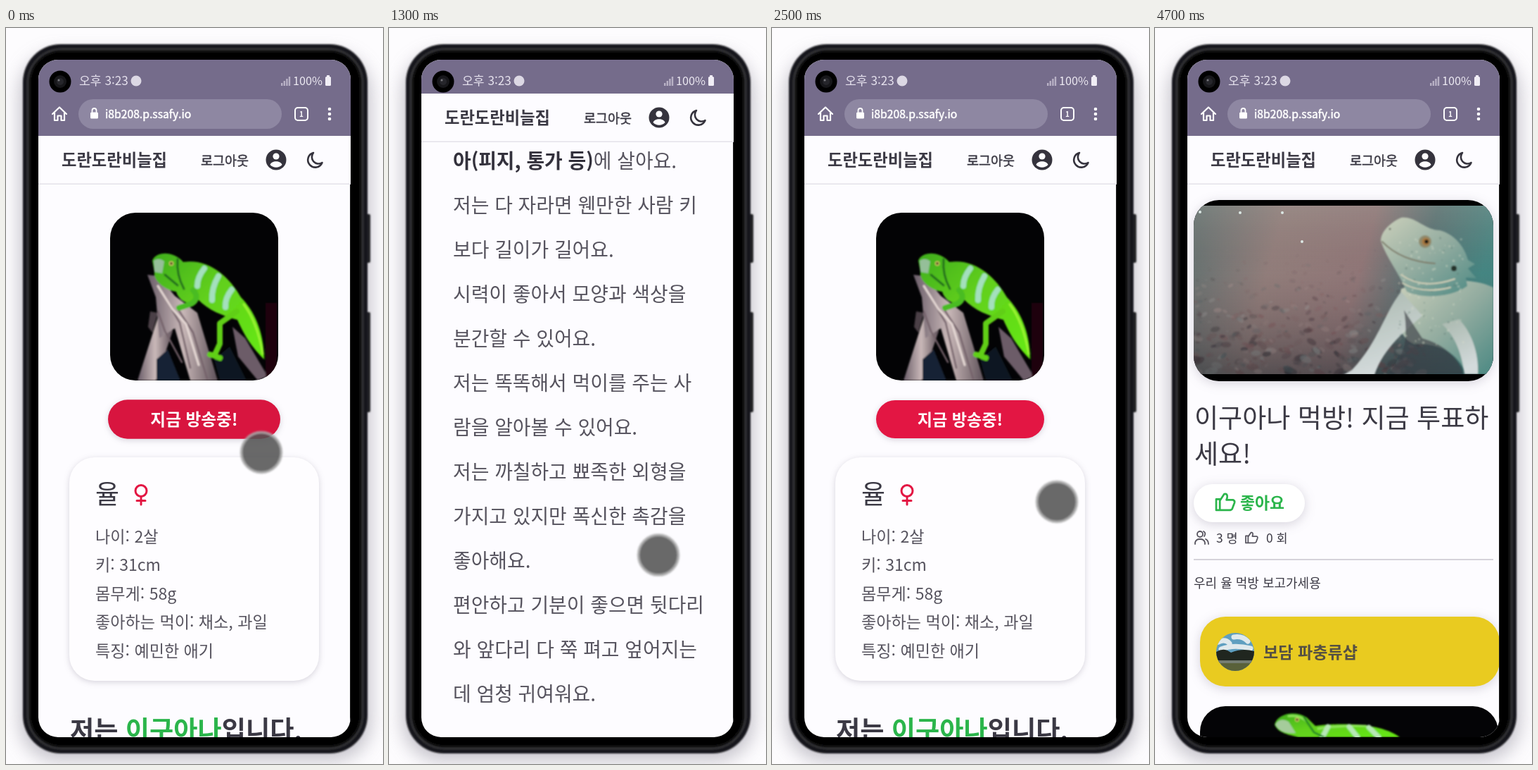
An HTML page for the animation above (4.8 s loop, 536 by 1044 pixels).

```html
<!DOCTYPE html>
<html lang="ko">
<head>
<meta charset="utf-8">
<style>
  html, body { margin: 0; width: 100%; height: 100%; overflow: hidden; background: #fdfcfe; }
  svg { display: block; width: 100vw; height: 100vh; }
  text { font-family: 'Noto Sans CJK KR', 'Noto Sans CJK JP', 'Noto Sans CJK', sans-serif; white-space: pre; }
  .line { fill: none; stroke-linecap: round; stroke-linejoin: round; }
  .soft { filter: drop-shadow(0 2px 4px rgba(60, 50, 80, .2)); }
  .glow { filter: drop-shadow(0 3px 8px rgba(60, 50, 80, .2)); }
</style>
</head>
<body>
<svg id="stage" viewBox="0 0 536 1044"></svg>
<script>
const LOOP = 4800;
const INK = '#3b3944', BODY = '#56535e', GREEN = '#2bb54b', RED = '#e31643', PAPER = '#fdfcff', PURPLE = '#756c8b';

// y is the optical centre of the Hangul glyphs
const text = (x, y, size, fill, weight, str, extra = '') =>
  `<text x="${x}" y="${y + size * .37}" font-size="${size}" fill="${fill}" font-weight="${weight}" ${extra}>${str}</text>`;
const medium = (x, y, size, fill, str) => text(x, y, size, fill, 400, str, `stroke="${fill}" stroke-width=".5"`);
const box = (x, y, w, h, r, fill, extra = '') =>
  `<rect x="${x}" y="${y}" width="${w}" height="${h}" rx="${r}" fill="${fill}" ${extra}/>`;
const dot = (x, y, r, fill, extra = '') => `<circle cx="${x}" cy="${y}" r="${r}" fill="${fill}" ${extra}/>`;
const shape = (d, fill, extra = '') => `<path d="${d}" fill="${fill}" ${extra}/>`;
const line = (d, color, width, extra = '') =>
  `<path class="line" d="${d}" stroke="${color}" stroke-width="${width}" ${extra}/>`;
const bold = (str, fill = '#33313c') => `<tspan font-weight="600" fill="${fill}">${str}</tspan>`;

function seeded(seed) {
  return () => (seed = (seed * 16807) % 2147483647) / 2147483647;
}

const defs = `<defs>
  <clipPath id="screen">${box(46, 45, 444, 961, 28, '#000')}</clipPath>
  <clipPath id="below">${box(46, 93, 444, 913, 0, '#000')}</clipPath>
  <clipPath id="photo">${box(148, 262, 239, 238, 36, '#000')}</clipPath>
  <clipPath id="video">${box(55, 244, 426, 257, 36, '#000')}</clipPath>
  <clipPath id="frame">${box(55, 252, 426, 239, 0, '#000')}</clipPath>
  <clipPath id="avatar">${dot(114, 885, 27, '#000')}</clipPath>
  <linearGradient id="skin" x2="1" y2="1">
    <stop stop-color="#3fae1c"/><stop offset=".45" stop-color="#62d01e"/><stop offset="1" stop-color="#66ea10"/>
  </linearGradient>
  <linearGradient id="bark" x2="1"><stop stop-color="#695c68"/><stop offset=".5" stop-color="#c9b8b8"/><stop offset="1" stop-color="#5f525a"/></linearGradient>
  <linearGradient id="scene" x2="1" y2=".15">
    <stop stop-color="#5d7271"/><stop offset=".3" stop-color="#94817e"/><stop offset=".6" stop-color="#92797a"/><stop offset=".8" stop-color="#4e7273"/><stop offset="1" stop-color="#3f8a86"/>
  </linearGradient>
  <linearGradient id="shade" x2="0" y2="1"><stop stop-color="#a39a94" stop-opacity=".35"/><stop offset=".4" stop-color="#7a5d5e" stop-opacity=".1"/><stop offset="1" stop-color="#23282e" stop-opacity=".55"/></linearGradient>
  <linearGradient id="dragon" x2="1" y2="1"><stop stop-color="#cbd0bb"/><stop offset=".5" stop-color="#93aca0"/><stop offset="1" stop-color="#4c8983"/></linearGradient>
  <linearGradient id="limb" x2=".3" y2="1"><stop stop-color="#a9b8ae"/><stop offset="1" stop-color="#d3dadb"/></linearGradient>
  <filter id="blur"><feGaussianBlur stdDeviation="1.3"/></filter>
  <filter id="soften"><feGaussianBlur stdDeviation=".8"/></filter>
  <filter id="halo" x="-20%" y="-20%" width="140%" height="140%"><feGaussianBlur stdDeviation="13"/></filter>
</defs>`;

function phone() {
  return box(19, 36, 500, 1004, 56, '#aeabb6', 'filter="url(#halo)" opacity=".7"') +
    `<g filter="url(#soften)">` +
    box(511, 264, 7, 69, 2, '#242428') + box(511, 403, 7, 142, 2, '#242428') +
    box(24, 23, 490, 1006, 54, '#19191c') +
    box(31, 30, 476, 992, 48, '#0a0a0b', 'stroke="#343437" stroke-width="2.5"') +
    box(36, 35, 466, 982, 42, '#000') + `</g>`;
}

function statusBar() {
  const bars = [0, 1, 2, 3].map(i => box(391 + i * 3.6, 78 - i * 3, 2.4, 4 + i * 3, 0, '#b8b1c5')).join('');
  return box(46, 45, 444, 48, 0, PURPLE) +
    dot(77, 76, 15.5, '#000') + dot(77, 76, 9, '#17171a') + dot(77, 76, 5, '#26262b') + dot(75, 74, 1.5, '#77777c') +
    text(104, 75, 17.2, '#e6e2ee', 400, '오후 3:23') + dot(185, 75, 7.5, '#dcd8e4') +
    bars + text(408, 75, 16.3, '#ece9f2', 400, '100%') +
    box(454, 69, 8, 13, 1.5, '#f0edf5') + box(456, 67, 4, 3, 0, '#f0edf5');
}

function browserBar() {
  return box(46, 93, 444, 60, 0, PURPLE) +
    line('M66 122 L76 112.5 L86 122 M69 120 V131 H73.5 V124.5 H78.5 V131 H83 V120', '#fff', 2.2) +
    box(103, 101, 289, 42, 21, '#8e87a2') +
    box(120, 119.5, 11, 9, 1.5, '#fff') + line('M122.5 119 V117 A3 3 0 0 1 128.5 117 V119', '#fff', 1.8) +
    medium(141, 122, 15.7, '#fff', 'i8b208.p.ssafy.io') +
    box(411, 113, 18, 18, 4, 'none', 'stroke="#fff" stroke-width="2"') +
    text(420, 122, 10, '#fff', 700, '1', 'text-anchor="middle"') +
    [115, 122, 129].map(y => dot(460, y, 2.3, '#fff')).join('');
}

function siteHeader() {
  return box(46, 153, 444, 68, 0, PAPER) + box(46, 220.5, 444, 1.5, 0, '#e4e2e9') +
    text(79, 187, 23.3, INK, 600, '도란도란비늘집') +
    medium(277, 188, 18.5, INK, '로그아웃') +
    dot(384, 187, 14.5, '#35333d') + dot(384, 182, 4.6, PAPER) +
    shape('M375.5 194 C377 187.5 391 187.5 392.5 194 C388 199 380 199 375.5 194Z', PAPER) +
    line('M437 177 A10.5 10.5 0 1 0 449.5 191 A9.5 9.5 0 0 1 437 177Z', '#35333d', 2.6);
}

function iguanaPhoto() {
  const stripes = [[282, 341, 272, 366], [302, 352, 293, 386], [321, 371, 312, 396]]
    .map(([a, b, c, d]) => line(`M${a} ${b} Q${a - 10} ${(b + d) / 2} ${c} ${d}`, '#a4e0bd', 8)).join('');
  return `<g clip-path="url(#photo)">` + box(148, 262, 239, 238, 0, '#030305') + `<g filter="url(#soften)">` +
    shape('M220 398 L187 500 H213 L237 430Z', 'url(#bark)') +
    shape('M205 402 L216 404 L208 432 L202 424Z', '#4b4047') +
    shape('M322 424 L340 440 L372 494 L358 500 L330 466Z', '#6c5c68') +
    shape('M201 350 L217 352 L240 380 L272 404 L301 500 H262 L240 426 L218 440 L213 382Z', 'url(#bark)') +
    line('M222 376 L247 418 L262 482 M244 398 L266 432 L286 498 M216 402 L226 430 L250 474', '#74626a', 2.5) +
    line('M216 366 L236 398 L256 420 L274 478', '#e5d8d4', 3) +
    shape('M214 470 L230 456 L248 500 H214Z', '#172334') + shape('M296 470 L318 452 L342 500 H304Z', '#101824') +
    box(369, 390, 16, 110, 0, '#29070d', 'opacity=".7"') +
    shape('M208 330 C212 317 238 315 252 332 C288 326 318 353 334 382 C352 400 367 430 367 470 C352 455 341 441 329 414 C308 408 288 401 272 384 C262 396 246 388 242 374 C226 372 209 358 211 346Z', 'url(#skin)') +
    line('M266 372 Q276 383 264 391 L246 397', '#4abc20', 8) +
    line('M328 402 L304 419 L304 448 L296 465 L290 463 M296 465 L304 468', '#61cf18', 8) +
    line('M338 392 Q357 417 365 462', '#9af431', 3) + stripes +
    shape('M210 330 Q218 325 225 331 L222 348 L211 346Z', '#95bf99') +
    line('M244 328 Q242 350 253 370 M226 350 L244 365', '#236e1d', 3) +
    dot(235, 334, 3.2, '#d6c764') + dot(235, 334, 1.7, '#111') + `</g></g>`;
}

function profilePage() {
  const facts = ['나이: 2살', '키: 31cm', '몸무게: 58g', '좋아하는 먹이: 채소, 과일', '특징: 예민한 애기'];
  const story = [
    `평균 수명은 ${bold('15년')}이에요.`, `주로 ${bold('멕시코, 중앙&amp;남아메리')}`,
    bold('카, 카리브해 지역 및 폴리네시'), `${bold('아(피지, 통가 등)')}에 살아요.`,
    '저는 다 자라면 웬만한 사람 키', '보다 길이가 길어요.', '시력이 좋아서 모양과 색상을', '분간할 수 있어요.',
    '저는 똑똑해서 먹이를 주는 사', '람을 알아볼 수 있어요.', '저는 까칠하고 뾰족한 외형을', '가지고 있지만 폭신한 촉감을',
    '좋아해요.', '편안하고 기분이 좋으면 뒷다리', '와 앞다리 다 쭉 펴고 엎어지는', '데 엄청 귀여워요.'];
  return iguanaPhoto() +
    `<g id="live">` + box(148, 528, 239, 54, 27, RED, 'id="livePill" class="soft"') +
    text(267.5, 555, 23.1, '#fff', 600, '지금 방송중!', 'text-anchor="middle"') + `</g>` +
    box(90, 609, 355, 317, 36, '#fefdff', 'class="soft"') +
    text(127, 661, 37, INK, 400, '율') +
    line('M192 665 V676 M186 670.5 H198', RED, 3) + dot(192, 656.5, 8, 'none', `stroke="${RED}" stroke-width="3"`) +
    facts.map((s, i) => text(127, 721 + i * 40.5, 23.1, BODY, 300, s)).join('') +
    text(91, 996, 37.2, INK, 600, `저는 ${bold('이구아나', GREEN)}입니다.`) +
    story.map((s, i) => text(91, 1071 + i * 63.07, 27.9, BODY, 300, s)).join('');
}

function dragonVideo() {
  const rnd = seeded(77);
  const tones = ['#c3aaa6', '#4d3b40', '#8c6062', '#a9adaa', '#3b383e', '#7a5c5d', '#56686a'];
  let gravel = '';
  for (let i = 0; i < 420; i++) {
    const depth = Math.sqrt(rnd()), y = 300 + 192 * depth, x = 55 + 330 * rnd(), r = 2 + rnd() * 8 * depth;
    gravel += `<ellipse cx="${x}" cy="${y}" rx="${r}" ry="${r * .55}" fill="${tones[i % 7]}" opacity="${(.2 + rnd() * .7) * depth}" transform="rotate(${rnd() * 90 - 45} ${x} ${y})"/>`;
  }
  let scales = '';
  for (let i = 0; i < 110; i++)
    scales += dot(345 + rnd() * 95, 295 + rnd() * 155, .8 + rnd(), i % 3 ? '#dbe2ce' : '#5c7770', 'opacity=".4"');
  return `<g id="clip" clip-path="url(#frame)">` + box(55, 252, 426, 239, 0, 'url(#scene)') +
    `<g filter="url(#blur)">${gravel}</g>` + box(55, 252, 426, 239, 0, 'url(#shade)') +
    [[64, 261], [121, 262], [181, 262], [209, 303]].map(([x, y]) => dot(x, y, 2, '#dce8e4')).join('') +
    `<g filter="url(#soften)">` +
    shape('M350 370 C380 360 444 350 481 368 V491 H442 C430 460 404 447 369 448 C345 440 342 410 350 370Z', 'url(#dragon)') +
    shape('M350 374 C326 404 318 445 280 485 L268 492 H312 C326 452 356 430 380 408Z', 'url(#limb)') +
    shape('M408 420 C428 438 436 463 440 491 H459 C461 460 449 430 432 413Z', 'url(#limb)') +
    shape('M354 400 C362 450 350 470 330 491 H438 C430 462 404 447 380 440Z', '#3c3f46', 'opacity=".65"') +
    shape('M321 302 C321 288 336 275 350 269 C370 266 384 287 405 287 C427 293 440 311 445 329 L455 335 L445 341 L457 355 L442 354 L444 366 C420 383 379 384 358 374 C347 348 329 326 321 302Z', 'url(#dragon)') +
    scales + line('M323 303 Q350 331 398 334', '#7e7d6b', 2) +
    line('M350 350 Q380 372 426 356 M352 362 Q380 378 420 368', '#d2cfb7', 2) +
    dot(384, 303, 9, '#8f8a6c') + dot(385, 303, 5.5, '#a8783f') + dot(386, 303, 2.8, '#171513') +
    dot(425, 341, 4, '#263129') + dot(334, 285, 1.5, '#666a5f') + `</g></g>`;
}

const thumb = 'M0 8 H5 V23 H0Z M5 10 L11 1 Q16 0 15 6 L14 9 H23 Q26 10 25 13 L22 21 Q21 23 18 23 H5';

function livePage() {
  return box(55, 244, 426, 257, 36, '#000', 'class="glow"') + `<g clip-path="url(#video)">${dragonVideo()}</g>` +
    text(56, 553, 37.1, INK, 400, '이구아나 먹방! 지금 투표하') + text(56, 604, 37.1, INK, 400, '세요!') +
    box(55, 647, 158, 54, 27, '#fff', 'class="glow"') +
    line(thumb, GREEN, 2.6, 'transform="translate(87 660) scale(1.04)"') +
    text(121, 674, 22.9, GREEN, 600, '좋아요') +
    dot(64, 718, 4, 'none', `stroke="${BODY}" stroke-width="1.8"`) +
    line('M57 732 V730 Q58 725 64 725 Q70 725 71 730 V732 M69 714 Q73 716 70 721 M72 725 Q76 727 76 732', BODY, 1.8) +
    text(87, 724, 17.5, INK, 400, '3 명') +
    line(thumb, BODY, 2.6, 'transform="translate(129 715) scale(.67)"') +
    text(158, 724, 17.5, INK, 400, '0 회') +
    box(55, 753, 426, 2, 0, '#d5d3da') +
    text(55, 787, 18, INK, 400, '우리 율 먹방 보고가세용') +
    box(64, 835, 426, 99, 36, '#e9cb20', 'class="glow"') +
    `<g clip-path="url(#avatar)" >` + box(87, 858, 54, 54, 0, '#5f9fc0') +
    line('M90 871 Q100 866 106 873 M112 864 Q124 862 132 870 M94 881 Q112 874 136 880', '#dfe9ec', 7) +
    shape('M87 885 Q98 878 108 886 Q124 879 141 884 V900 H87Z', '#20261f') +
    box(87, 897, 54, 16, 0, '#59613a') + box(87, 897, 54, 4, 0, '#747d72') + `</g>` +
    text(154, 885, 23.1, '#555043', 600, '보담 파충류샵') +
    box(64, 962, 424, 90, 36, '#040406') + `<g filter="url(#soften)">` +
    shape('M170 988 C174 973 198 967 216 978 L228 990 C266 985 322 986 348 1006 H204 C192 1003 174 1000 170 988Z', 'url(#skin)') +
    shape('M171 988 Q178 977 190 984 L200 1000 Q178 1002 171 988Z', '#a5cc9b') +
    line('M190 976 Q206 974 216 984 M232 994 Q262 989 300 990', '#8fe65a', 3) +
    line('M246 991 L238 1006 M276 991 L288 1006 M304 992 L318 1006', '#b8e8b6', 7) +
    line('M212 978 L226 999 L240 1006', '#278a22', 3) + dot(202, 981, 3, '#d5c765') + dot(202, 981, 1.6, '#111') + `</g>`;
}

document.getElementById('stage').innerHTML = defs +
  box(0, 0, 536, 1044, 0, '#fdfcfe') + phone() +
  `<g clip-path="url(#screen)">` + box(46, 45, 444, 961, 0, PAPER) +
  `<g clip-path="url(#below)"><g id="profile">${profilePage()}</g><g id="broadcast">${livePage()}</g>` +
  box(489, 160, 1, 846, 0, '#222') + `<g id="bars">${browserBar()}${siteHeader()}</g></g>` + statusBar() + `</g>` +
  `<g id="touch">` + dot(0, 0, 28.5, 'rgba(82,82,82,.87)', 'stroke="rgba(175,175,175,.75)" stroke-width="4" filter="url(#soften)"') + `</g>`;

const ids = ['profile', 'broadcast', 'bars', 'touch', 'live', 'livePill', 'clip'];
const el = Object.fromEntries(ids.map(id => [id, document.getElementById(id)]));

const scrollPath = [[0, 0], [250, 0], [400, 60], [600, 222], [800, 520], [1000, 810], [1200, 1072],
  [1340, 1072], [1800, 623], [2300, 105], [2430, 0]];
const touchPath = [[0, 363, 602], [250, 470, 685], [500, 383, 747], [1900, 383, 748], [2400, 405, 672],
  [2500, 405, 672], [2800, 340, 565], [3100, 340, 562], [3550, 484, 660], [3850, 475, 688]];
const hoverPath = [[0, 1], [150, 0], [2700, 0], [2850, 1]];

function track(points, t, ease = k => k) {
  const next = points.findIndex(p => p[0] > t);
  if (next < 0) return points[points.length - 1].slice(1);
  const a = points[next - 1], b = points[next];
  const k = ease((t - a[0]) / (b[0] - a[0]));
  return a.slice(1).map((v, i) => v + (b[i + 1] - v) * k);
}
const smooth = k => k * k * (3 - 2 * k);
const show = (node, on) => node.setAttribute('visibility', on ? 'inherit' : 'hidden');
const move = (node, x, y) => node.setAttribute('transform', `translate(${x} ${y})`);

function draw(t) {
  const [scroll] = track(scrollPath, t);
  const [x, y] = track(touchPath, t, smooth);
  const [hover] = track(hoverPath, t);
  const live = t >= 3100;
  move(el.profile, 0, -scroll);
  move(el.bars, 0, -Math.min(scroll, 60));
  move(el.touch, x, y);
  const s = 1 + .025 * hover;
  el.live.setAttribute('transform', `translate(267.5 555) scale(${s}) translate(-267.5 -555)`);
  el.livePill.setAttribute('fill', `rgb(${227 - 11 * hover},${22 - hover},${67 - 4 * hover})`);
  show(el.profile, !live);
  show(el.broadcast, live);
  show(el.clip, t >= 4300);
  show(el.touch, t < 4400);
}

const start = performance.now();
function tick() {
  draw((performance.now() - start) % LOOP);
  requestAnimationFrame(tick);
}
tick();
</script>
</body>
</html>
```
